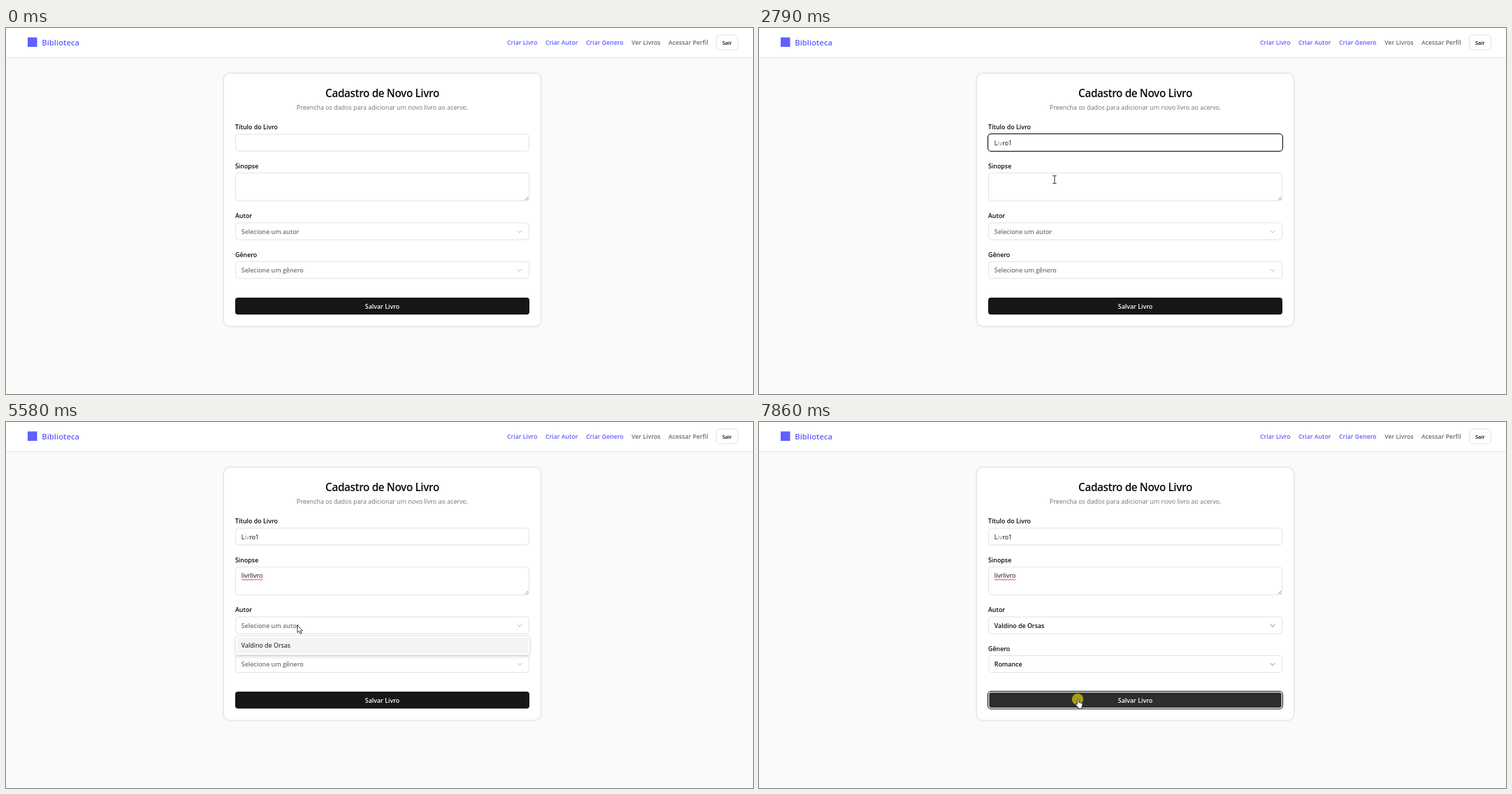
Animation of 1069 by 524 pixels, one loop 7.99 s. Source, as an HTML page:

```html
<!DOCTYPE html>
<html lang="pt-BR">
<head>
<meta charset="utf-8">
<title>Cadastro de Novo Livro</title>
<style>
  html, body { margin: 0; width: 100%; height: 100%; overflow: hidden; background: #f9fafa; }
  svg { display: block; width: 1069px; height: 524px; }
  text { font: 8.95px "Open Sans", "Noto Sans", sans-serif; fill: #0a0a0a; white-space: pre; }
  .semi { font-size: 8.85px; font-weight: 600; }
  .nav { font-size: 8.72px; font-weight: 600; fill: #6b6b6b; }
  .brand { font-size: 11.25px; font-weight: 600; }
  .nav.link, .brand { fill: #615fff; }
  .title { font-size: 15.3px; font-weight: 600; letter-spacing: -.025em; }
  .small { font-size: 7.5px; font-weight: 600; }
  .muted { fill: #737373; }
  .light { fill: #fff; }
  .mid { text-anchor: middle; }
  .box { fill: #fff; stroke: #e4e4e4; }
  .field { filter: drop-shadow(0 .7px .7px rgba(0, 0, 0, .05)); }
  .card { filter: drop-shadow(0 .8px 1.2px rgba(0, 0, 0, .12)); }
  .menu > .box { filter: drop-shadow(0 2px 2.5px rgba(0, 0, 0, .13)); }
  .ring { fill: none; stroke: #0a0a0a; }
  .chevron { fill: none; stroke: #737373; stroke-linecap: round; stroke-linejoin: round; }
  .pointer { fill: #fff; stroke: #111; stroke-width: .8; stroke-linejoin: round; }
</style>
</head>
<body>
<svg viewBox="0 0 1069 524">
  <rect width="1069" height="42" fill="#fff"/>
  <rect y="42" width="1069" height="1" fill="#e5e6e6"/>
  <rect x="31" y="13.5" width="13.5" height="13.5" fill="#615fff"/>
  <text class="brand" x="51.3" y="24.7">Biblioteca</text>
  <text class="nav link" x="717" y="23.7">Criar Livro</text>
  <text class="nav link" x="772" y="23.7">Criar Autor</text>
  <text class="nav link" x="830" y="23.7">Criar Genero</text>
  <text class="nav" x="895.3" y="23.7">Ver Livros</text>
  <text class="nav" x="948" y="23.7">Acessar Perfil</text>
  <rect class="box field" x="1016.5" y="10" width="31" height="21" rx="4"/>
  <text class="small mid" x="1031.8" y="23.6">Sair</text>

  <rect class="box card" x="311.5" y="65" width="454" height="362" rx="9"/>
  <text class="title mid" x="538.5" y="98.7">Cadastro de Novo Livro</text>
  <text class="muted mid" x="538.6" y="117.3">Preencha os dados para adicionar um novo livro ao acervo.</text>

  <text class="semi" x="328" y="145">Título do Livro</text>
  <text class="semi" x="328" y="200.5">Sinopse</text>
  <text class="semi" x="328" y="272">Autor</text>
  <text class="semi" x="328" y="327.7">Gênero</text>

  <rect class="box field" x="328.5" y="152" width="420" height="24" rx="4"/>
  <rect class="box field" x="328.5" y="207.5" width="420" height="40" rx="4"/>
  <path d="M742.5 246.5L747.5 241.5M745.5 246.5L747.5 244.5" stroke="#777" stroke-width=".8"/>
  <rect class="box field" x="328.5" y="279" width="420" height="24" rx="4"/>
  <rect class="box field" x="328.5" y="334.5" width="420" height="24" rx="4"/>
  <path class="chevron" id="authorArrow" d="M732 290L735 293L738 290"/>
  <path class="chevron" id="genreArrow" d="M732 345.5L735 348.5L738 345.5"/>

  <text id="bookTitle" x="336.8" y="167.6"><tspan></tspan><tspan fill="#999"></tspan><tspan></tspan></text>
  <text id="synopsis" x="336.8" y="223.3"></text>
  <path id="squiggle" fill="none" stroke="#e5202c" stroke-width=".9"/>
  <text class="semi" id="author" x="336.8" y="294.5"></text>
  <text class="semi" id="genre" x="336.8" y="350"></text>

  <rect id="save" x="328" y="386" width="421" height="24.3" rx="4" fill="#171717"/>
  <g id="saveRing">
    <rect x="327.5" y="385.5" width="422" height="25.3" rx="4.5" fill="#fff" stroke="#0a0a0a"/>
    <rect x="329.3" y="387.2" width="418.4" height="21.9" rx="3" fill="#2e2e2e"/>
  </g>
  <text class="semi light mid" x="538.5" y="401.5">Salvar Livro</text>

  <rect class="ring" id="ring" x="327.5" width="422" rx="4.5"/>
  <rect id="caret" width="1" height="13" fill="#0a0a0a"/>

  <g id="popup">
    <path d="M403.5 182.5L409 177L414.5 182.5Z" fill="#1b1b1e"/>
    <rect x="395" y="182" width="105.7" height="54.3" rx="2" fill="#1b1b1e"/>
    <text class="semi light" x="403" y="200.6">O Marfelino</text>
    <text class="semi light" x="403" y="225">Dorvalen</text>
  </g>

  <g class="menu" id="menu">
    <rect class="box" x="328.5" y="0" width="421" height="27.5" rx="4"/>
    <rect x="331" y="3" width="416" height="22" rx="2.7" fill="#f4f4f4"/>
    <text id="option" x="336.8" y="17.1"></text>
  </g>

  <g id="cursor">
    <circle id="press" r="8.2" fill="#fff200" fill-opacity=".58"/>
    <path class="pointer" id="arrow" d="M0 0V10.6L2.5 8.4L4.2 12.4L6 11.6L4.3 7.8H7.6Z"/>
    <path id="beam" fill="none" stroke="#222" d="M-2.5 -5.5H-.6L0 -5L.6 -5.5H2.5M0 -5V5M-2.5 5.5H-.6L0 5L.6 5.5H2.5"/>
    <path class="pointer" id="hand" d="M-.6 .8Q.5 -1 1.6 .8V4.6L6 5.5Q7.2 6 7 7.6L6 11.2V13.4H.6V11.6L-2.8 8Q-3.4 6.2 -1.8 6.4L-.6 7.4Z"/>
  </g>
</svg>
<script>
const LOOP = 7990, STEP = 70;
const $ = id => document.getElementById(id);
const within = (t, a, b) => t >= a && t < b;
const show = (id, on) => $(id).setAttribute('visibility', on ? 'visible' : 'hidden');
const set = (id, attrs) => { for (const k in attrs) $(id).setAttribute(k, attrs[k]); };
const ease = u => u < .5 ? 2 * u * u : 1 - 2 * (1 - u) ** 2;

const AUTHOR = 'Valdino de Orsas', GENRE = 'Romance';

// Pointer moves: start, end, target x, target y
const moves = [
  [110, 590, 429, 169],
  [2440, 2790, 423, 217],
  [5090, 5440, 417, 291],
  [5580, 5860, 415, 318],
  [6260, 6540, 407, 347],
  [6750, 7100, 404, 377],
  [7370, 7790, 456, 397]
];
const presses = [[660, 800], [2860, 2930], [5510, 5580], [5930, 6000], [6610, 6680], [7300, 7370], [7860, LOOP]];

// Focus rings: start, end, y, height
const rings = [
  [660, 2860, 151.5, 25],
  [2860, 4480, 207, 41],
  [4480, 5510, 278.5, 25],
  [6000, 6610, 278.5, 25],
  [7370, 7860, 334, 25]
];
const carets = [[660, 1260], [1520, 2650], [2860, 3410], [3480, 4480]];
const menus = [[5510, 6000, 306.3, AUTHOR], [6610, 7370, 362, GENRE]];

const active = (list, t) => list.find(([a, b]) => within(t, a, b));

function pointerAt(t) {
  let x = 1043, y = 512;
  for (const [from, to, tx, ty] of moves) {
    if (t < from) break;
    const held = from + Math.floor((t - from) / STEP) * STEP;
    const u = ease(Math.min(1, (held - from) / (to - from)));
    x += (tx - x) * u;
    y += (ty - y) * u;
  }
  return [x, y];
}

function typed(text, t, start, gap) {
  return text.slice(0, Math.max(0, Math.floor((t - start) / gap + 1.001)));
}

function drawSelect(id, value, placeholder, chosen) {
  $(id).textContent = chosen ? value : placeholder;
  $(id).classList.toggle('muted', !chosen);
  set(id + 'Arrow', { opacity: chosen ? .9 : .5 });
}

function drawFields(t) {
  const word = typed('Livro1', t, 1520, 120);
  [word.slice(0, 1), word.slice(1, 3), word.slice(3)].forEach((part, i) => {
    $('bookTitle').children[i].textContent = part;
  });
  $('synopsis').textContent = t < 3680 ? typed('l', t, 3480, 100) : 'l' + typed('ivrlivro', t, 3680, 95.7);
  show('squiggle', t >= 5160);
  drawSelect('author', AUTHOR, 'Selecione um autor', t >= 6000);
  drawSelect('genre', GENRE, 'Selecione um gênero', t >= 7370);

  const ring = active(rings, t);
  show('ring', ring);
  if (ring) set('ring', { y: ring[2], height: ring[3] });

  const inTitle = t < 2860;
  show('caret', active(carets, t));
  set('caret', {
    x: 337 + Math.round($(inTitle ? 'bookTitle' : 'synopsis').getComputedTextLength()),
    y: inTitle ? 158 : 213.5
  });
}

function drawMenu(t) {
  const menu = active(menus, t);
  show('menu', menu);
  if (!menu) return;
  const [from, , y, label] = menu;
  const u = Math.min(1, (t - from + STEP) / (2 * STEP));
  const scale = .95 + .05 * u;
  $('option').textContent = label;
  set('menu', { opacity: u, transform: `translate(${539 * (1 - scale)} ${y}) scale(${scale})` });
}

function drawPointer(t) {
  const [x, y] = pointerAt(t);
  const inForm = x > 328 && x < 749;
  const overText = inForm && (within(y, 152, 177) || within(y, 207, 248));
  const overSave = inForm && within(y, 386, 411);
  set('cursor', { transform: `translate(${x} ${y})`, display: t < 110 ? 'none' : 'inline' });
  show('press', active(presses, t));
  show('beam', overText);
  show('hand', overSave);
  show('arrow', !overText && !overSave);
  set('save', { fill: overSave ? '#2e2e2e' : '#171717' });
}

function render(t) {
  drawFields(t);
  drawMenu(t);
  drawPointer(t);
  show('popup', within(t, 730, 1590));
  show('saveRing', t >= 7860);
}

let wave = 'M337 226.6';
for (let i = 1; i <= 15; i++) wave += `L${337 + i * 2.03} ${i % 2 ? 224.9 : 226.6}`;
set('squiggle', { d: wave });

const began = performance.now();
function tick() {
  render((performance.now() - began) % LOOP);
  requestAnimationFrame(tick);
}
tick();
</script>
</body>
</html>
```
